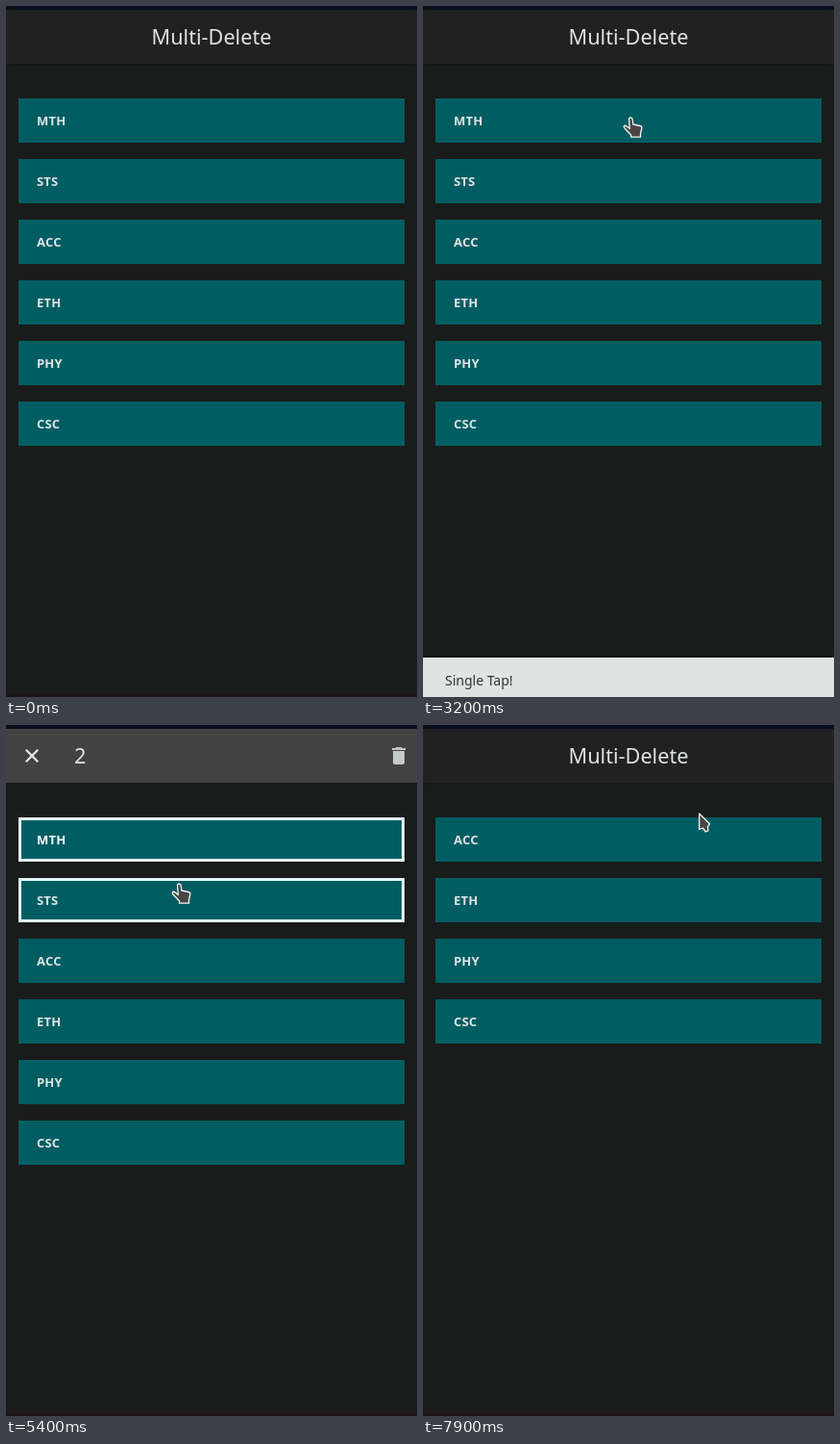
These frames come from a looping animation (428x718 px, 8 s). An HTML page:

```html
<!DOCTYPE html>
<html lang="en">
<head>
<meta charset="utf-8">
<title>Multi-Delete</title>
<style>
  html, body { margin: 0; width: 100%; height: 100%; overflow: hidden; background: #1a1c1b; }
  body { font-family: "Noto Sans", "Open Sans", sans-serif; color: #e0e3e3; }
  #stage { position: absolute; left: 0; top: 0; width: 428px; height: 718px; overflow: hidden; }
  #stage div, #stage span, #stage svg { position: absolute; }

  /* One shared clock; motion is sampled ten times a second. */
  .run { animation: 8s step-end -5ms infinite; }

  .edge { left: 0; width: 428px; }
  .top { top: 0; height: 4px; background: #060f1b; }
  .bottom { top: 715px; height: 3px; background: #1d1417; }

  .bar { left: 0; top: 4px; width: 428px; height: 56px; line-height: 56px; font-size: 21.7px;
         background: #212121; box-shadow: 0 1px 3px rgba(0,0,0,.25); animation-name: bar; }
  .title { left: 0; width: 428px; text-align: center; animation-name: title; }
  .count { left: 71px; opacity: 0; }
  .one { animation-name: one; }
  .two { animation-name: two; }
  .tools { left: 0; top: 0; opacity: 0; animation-name: tools; }
  .tap { left: 387px; top: 6px; width: 44px; height: 44px; border-radius: 50%;
         background: rgba(204,204,204,.25); opacity: 0; animation-name: tap; }

  .card { left: 13px; top: calc(96px + 63px * var(--i)); width: 402px; height: 46px;
          overflow: hidden; background: #005e63; }
  .label { inset: 0; padding-left: 19px; line-height: 46px; font-size: 13px; font-weight: 600;
           letter-spacing: .2px; }
  .gone { animation-name: gone; }
  .rest { left: 0; top: 0; animation-name: rest; }
  .glow { inset: 0; background: rgba(204,204,204,.25); opacity: 0; }
  .splash { width: 314px; height: 314px; margin: -157px; border-radius: 50%;
            background: rgba(204,204,204,.25); opacity: 0; }
  .first .glow { animation-name: glow1; }
  .first .splash { left: 202px; top: 23px; animation-name: splash1; }
  .first .label { animation-name: pick1; }
  .second .glow { animation-name: glow2; }
  .second .splash { left: 168px; top: 15px; animation-name: splash2; }
  .second .label { animation-name: pick2; }

  .snack { left: 0; top: 718px; width: 428px; height: 48px; line-height: 47px; padding-left: 23px;
           font-size: 14px; background: #e1e3e3; color: #323232;
           box-shadow: 0 -1px 2px rgba(0,0,0,.5); animation-name: snack; }

  .cursor { left: 0; top: 0; width: 0; height: 0; animation-name: move; }
  .cursor svg { overflow: visible; width: 24px; height: 24px; opacity: 0;
                fill: #484545; stroke: #f4f4f4; stroke-width: 1.3; stroke-linejoin: round; }
  .hand { left: -9px; animation-name: hand; }
  .arrow { animation-name: arrow; }

  @keyframes bar { 0%, 87.5% { background: #212121; } 55% { background: #424242; } 100% { background: #212121; } }
  @keyframes title { 0%, 87.5%, 100% { opacity: 1; } 55% { opacity: 0; } }
  @keyframes tools { 0%, 87.5%, 100% { opacity: 0; } 55% { opacity: 1; } }
  @keyframes one { 0%, 65%, 100% { opacity: 0; } 55% { opacity: 1; } }
  @keyframes two { 0%, 87.5%, 100% { opacity: 0; } 65% { opacity: 1; } }
  @keyframes tap {
    0%, 100% { opacity: 0; transform: scale(.2); }
    85% { opacity: 1; transform: scale(.4); animation-timing-function: steps(2); }
    87.5% { opacity: 0; transform: scale(1); }
  }

  @keyframes gone { 0% { opacity: 1; } 87.5%, 100% { opacity: 0; } }
  @keyframes rest { 0% { transform: none; } 87.5%, 100% { transform: translateY(-126px); } }
  @keyframes glow1 {
    0%, 31.25%, 57.5%, 100% { opacity: 0; }
    22.5%, 48.75%, 56.25% { opacity: .25; }
    23.75%, 50%, 55% { opacity: .75; }
    25%, 51.25% { opacity: 1; }
    28.75% { opacity: 1; animation-timing-function: steps(2); }
  }
  @keyframes splash1 {
    0% { opacity: 0; transform: scale(0); }
    23.75% { opacity: 1; transform: translateX(-9px) scale(.33); animation-timing-function: steps(4); }
    28.75% { opacity: 1; transform: translateX(-9px) scale(1.22); animation-timing-function: steps(2); }
    31.25% { opacity: 0; transform: scale(1.6); }
    48.75% { opacity: 1; transform: scale(.11); animation-timing-function: steps(4); }
    53.75% { opacity: 1; transform: scale(1); }
    55% { opacity: .75; transform: scale(1.22); animation-timing-function: steps(2); }
    57.5%, 100% { opacity: 0; transform: scale(1.6); }
  }
  @keyframes glow2 {
    0%, 67.5%, 100% { opacity: 0; }
    62.5%, 66.25% { opacity: .25; }
    63.75%, 65% { opacity: .75; }
  }
  @keyframes splash2 {
    0%, 100% { opacity: 0; transform: scale(0); }
    62.5% { opacity: 1; transform: scale(.11); animation-timing-function: steps(2); }
    65% { opacity: 1; transform: scale(.6); animation-timing-function: steps(2); }
    67.5% { opacity: 0; transform: scale(1.6); }
  }
  @keyframes pick1 {
    0% { box-shadow: none; color: #e0e3e3; }
    55%, 100% { box-shadow: inset 0 0 0 3px #e2f4f5; color: #fff; }
  }
  @keyframes pick2 {
    0% { box-shadow: none; color: #e0e3e3; }
    65% { box-shadow: inset 0 0 0 3px #e2f4f5; color: #e0e3e3; }
    70%, 100% { box-shadow: inset 0 0 0 3px #e2f4f5; color: #fff; }
  }

  @keyframes snack {
    0%, 42.5%, 100% { transform: translateY(3px); }
    31.25% { transform: translateY(-25px); }
    32.5% { transform: translateY(-46px); }
    33.75% { transform: translateY(-48px); }
    40% { transform: translateY(-41px); }
    41.25% { transform: translateY(-12px); }
  }

  @keyframes move {
    0% { transform: translate(231px, 125px); }
    18.75% { transform: translate(231px, 125px); animation-timing-function: steps(3); }
    22.5% { transform: translate(206px, 116px); animation-timing-function: steps(4); }
    27.5% { transform: translate(217px, 115px); }
    35% { transform: translate(217px, 115px); animation-timing-function: steps(2); }
    37.5% { transform: translate(219px, 74px); animation-timing-function: steps(2); }
    40% { transform: translate(217px, 115px); }
    60% { transform: translate(217px, 115px); animation-timing-function: steps(2); }
    62.5% { transform: translate(181px, 164px); }
    71.25% { transform: translate(181px, 164px); animation-timing-function: steps(6); }
    78.75% { transform: translate(387px, 28px); }
    83.75% { transform: translate(410px, 25px); }
    93.75% { transform: translate(410px, 25px); animation-timing-function: steps(4); }
    98.75%, 100% { transform: translate(287px, 91px); }
  }
  @keyframes hand {
    0%, 36.25%, 75%, 95%, 100% { opacity: 0; }
    18.75%, 40%, 83.75% { opacity: 1; }
  }
  @keyframes arrow {
    0%, 40%, 83.75% { opacity: 0; }
    36.25%, 75%, 95%, 100% { opacity: 1; }
  }
</style>
</head>
<body>
<div id="stage">
  <div class="edge top"></div>
  <div class="edge bottom"></div>

  <div class="bar run">
    <span class="title run">Multi-Delete</span>
    <span class="count one run">1</span>
    <span class="count two run">2</span>
    <svg class="tools run" width="428" height="56">
      <path d="M20.8 21.8l12.4 12.4M33.2 21.8L20.8 34.2" stroke="#e4e6e6" stroke-width="2.3"/>
      <path transform="translate(397 16)" fill="#c3cbca"
        d="M6 19c0 1.1.9 2 2 2h8c1.1 0 2-.9 2-2V7H6zM19 4h-3.5l-1-1h-5l-1 1H5v2h14z"/>
    </svg>
    <div class="tap run"></div>
  </div>

  <div class="card first gone run" style="--i:0">
    <div class="glow run"></div><div class="splash run"></div><span class="label run">MTH</span>
  </div>
  <div class="card second gone run" style="--i:1">
    <div class="glow run"></div><div class="splash run"></div><span class="label run">STS</span>
  </div>
  <div class="rest run">
    <div class="card" style="--i:2"><span class="label">ACC</span></div>
    <div class="card" style="--i:3"><span class="label">ETH</span></div>
    <div class="card" style="--i:4"><span class="label">PHY</span></div>
    <div class="card" style="--i:5"><span class="label">CSC</span></div>
  </div>

  <div class="snack run">Single Tap!</div>

  <div class="cursor run">
    <svg class="hand run"><path d="M6.5 3Q6.5 1 8.3 1Q10 1 10.2 3L10.8 8L18 9.5Q20.2 10 19.8 12L18.5 17.5V21.2H8.6V19L2 12Q.6 10 1.8 9.4Q3 8.9 4.5 10.3L7.3 12.5Z"/></svg>
    <svg class="arrow run"><path d="M.7 1V17.5L4.5 16.2L7.3 20L10 18.6L9.4 14.6L11.6 11.8Z"/></svg>
  </div>
</div>
</body>
</html>
```
